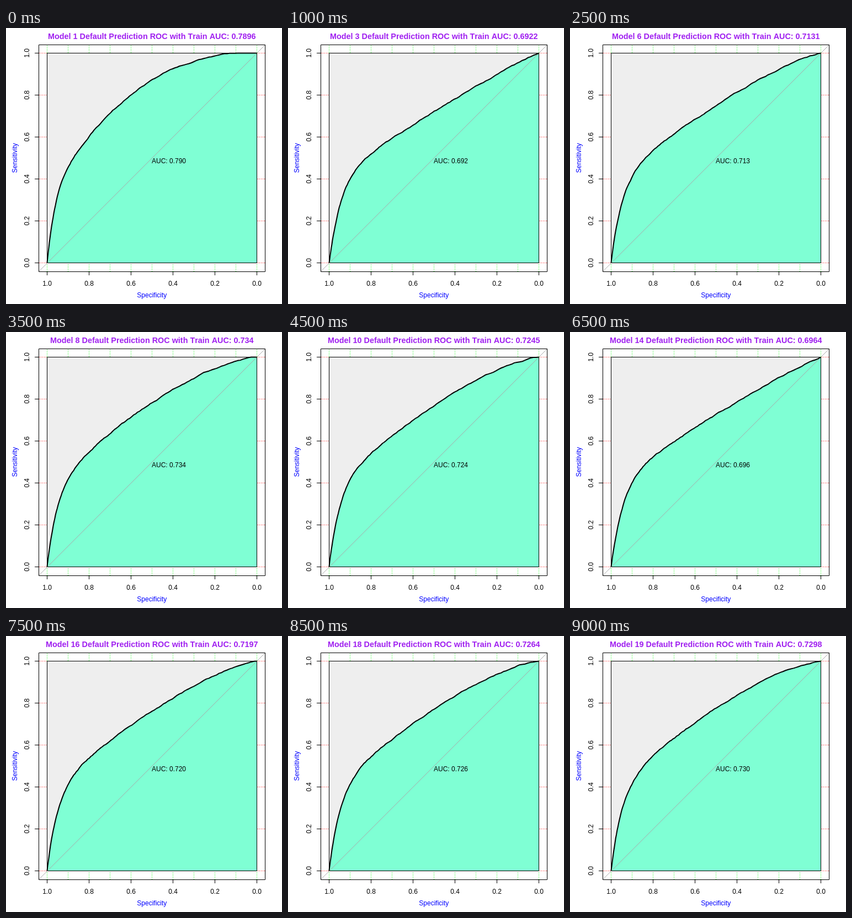
An HTML page with a canvas for the animation above (9500 ms loop, 500 by 500 pixels).

```html
<!DOCTYPE html>
<html lang="en">
<head>
<meta charset="utf-8">
<title>ROC curves</title>
<style>
html, body { margin: 0; width: 100%; height: 100%; overflow: hidden; background: #fff; }
canvas { display: block; width: 500px; height: 500px; }
</style>
</head>
<body>
<canvas id="stage" width="500" height="500"></canvas>
<script>
const ctx = document.getElementById('stage').getContext('2d');
const STEP = 500;
const LEFT = 74.5, BASE = 425.5, SIZE = 380;
const BOX = { left: 59.5, top: 30.5, right: 469.5, bottom: 441.5 };
const FONT = 'Arial, "Liberation Sans", sans-serif';

// Area under the curve of each model, in order.
const aucs = [
  0.7896, 0.7409, 0.6922, 0.6922, 0.7131, 0.7131, 0.7236, 0.734, 0.72449, 0.72449,
  0.7046, 0.7046, 0.6847, 0.6964, 0.708, 0.7197, 0.7231, 0.7264, 0.7298
];

// A fast early rise plus a slow power curve; the power is chosen so the area equals auc.
function rocCurve(auc) {
  const rise = 0.405 - 0.75 * (auc - 0.69);
  const width = 0.058 - 0.2 * (auc - 0.685);
  const mean = (auc - rise * (1 - width)) / (1 - rise);
  const power = mean / (1 - mean);
  return x => rise * (1 - Math.exp(-x / width)) + (1 - rise) * (1 - (1 - x) ** power);
}

function random(seed) {
  let s = seed;
  return () => (s = (s * 16807) % 2147483647) / 2147483647;
}

// Samples lie closer together on the steep left side; drift gives the small steps.
function curvePoints(auc) {
  const roc = rocCurve(auc), rnd = random(Math.round(auc * 1e5));
  const count = 120, pts = [[LEFT, BASE]];
  let drift = 0, height = 0;
  for (let i = 1; i < count; i++) {
    const x = (i / count) ** 1.6;
    drift = drift * 0.8 + (rnd() - 0.5) * 1.6;
    height = Math.min(SIZE, Math.max(height, roc(x) * SIZE + drift));
    pts.push([LEFT + x * SIZE, BASE - height]);
  }
  pts.push([LEFT + SIZE, BASE - SIZE]);
  return pts;
}

function trace(pts) {
  ctx.beginPath();
  pts.forEach(p => ctx.lineTo(p[0], p[1]));
}

function line(x1, y1, x2, y2, color, dash = []) {
  ctx.strokeStyle = color;
  ctx.lineWidth = 1;
  ctx.setLineDash(dash);
  trace([[x1, y1], [x2, y2]]);
  ctx.stroke();
  ctx.setLineDash([]);
}

function frame(x, y, w, h) {
  ctx.strokeStyle = '#000';
  ctx.lineWidth = 1;
  ctx.strokeRect(x, y, w, h);
}

function label(str, x, y, { color = '#000', font = '12px ', align = 'center', up = false } = {}) {
  ctx.save();
  ctx.translate(x, y);
  if (up) ctx.rotate(-Math.PI / 2);
  ctx.font = font + FONT;
  ctx.fontKerning = 'none';
  ctx.textAlign = align;
  ctx.fillStyle = color;
  ctx.fillText(str, 0, 0);
  ctx.restore();
}

function drawGrid() {
  for (let i = 0; i <= 10; i++) {
    const x = LEFT + i * SIZE / 10;
    line(x, 441, x, 31, '#00ff00', [1, 2]);
  }
  for (let i = 0; i <= 5; i++) {
    const y = BASE - i * SIZE / 5;
    line(60, y, 469, y, '#ff0000', [1, 2]);
  }
}

function drawAxes() {
  frame(BOX.left, BOX.top, BOX.right - BOX.left, BOX.bottom - BOX.top);
  for (let i = 0; i <= 5; i++) {
    const x = LEFT + i * SIZE / 5, y = BASE - i * SIZE / 5;
    line(x, 441, x, 448, '#000');
    line(52, y, 60, y, '#000');
    label((1 - i / 5).toFixed(1), x, 467);
    label((i / 5).toFixed(1), 42, y, { up: true });
  }
  label('Specificity', 264.3, 488, { color: '#0000ff' });
  label('Sensitivity', 20, 235.5, { color: '#0000ff', up: true });
}

function draw(index) {
  const auc = aucs[index];
  const pts = curvePoints(auc);
  ctx.fillStyle = '#fff';
  ctx.fillRect(0, 0, 500, 500);
  drawGrid();

  ctx.fillStyle = '#eeeeee';
  ctx.fillRect(LEFT, BASE - SIZE, SIZE, SIZE);
  trace([...pts, [LEFT + SIZE, BASE]]);
  ctx.fillStyle = '#7fffd4';
  ctx.fill();
  frame(LEFT, BASE - SIZE, SIZE, SIZE);

  line(BOX.left, BOX.bottom - 0.5, BOX.right, BOX.top, '#a9a9a9');
  trace(pts);
  ctx.strokeStyle = '#000';
  ctx.lineWidth = 2;
  ctx.lineJoin = 'round';
  ctx.stroke();

  drawAxes();
  label('AUC: ' + auc.toFixed(3), 264, 245, { align: 'left' });
  label(`Model ${index + 1} Default Prediction ROC with Train AUC: ${+auc.toFixed(4)}`,
    264.3, 20, { color: '#a020f0', font: 'bold 14.4px ' });
}

let shown = 0;
const start = performance.now();
function tick(now) {
  const index = Math.floor(Math.max(0, now - start) / STEP) % aucs.length;
  if (index !== shown) draw(shown = index);
  requestAnimationFrame(tick);
}
draw(shown);
requestAnimationFrame(tick);
</script>
</body>
</html>
```
